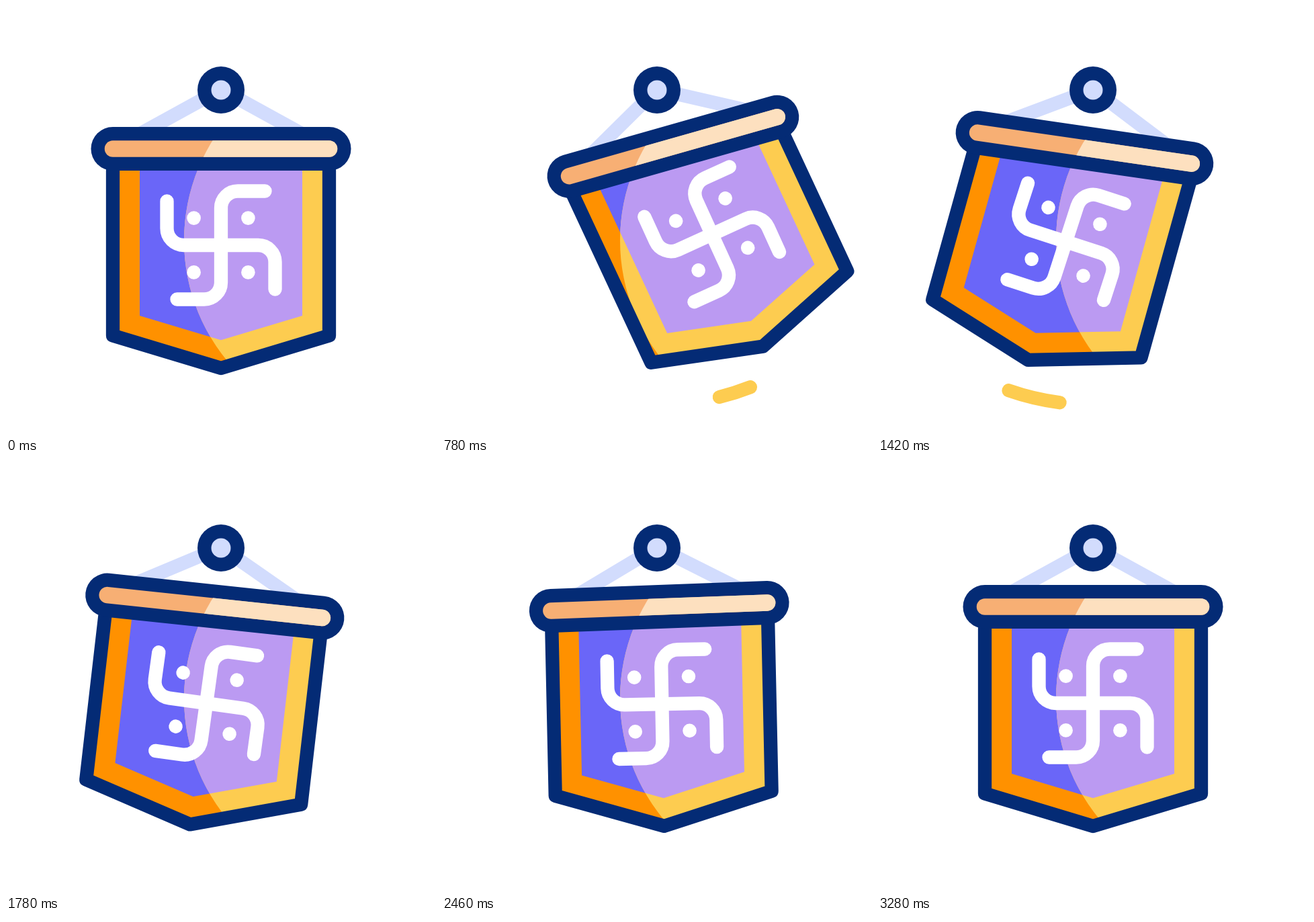
These frames come from a looping animation (640x640 px, 3.6 s). An HTML page with a canvas:

```html
<!DOCTYPE html>
<html lang="en">
<head>
<meta charset="utf-8">
<title>Swinging banner</title>
<style>
  html, body { margin: 0; width: 100%; height: 100%; overflow: hidden; background: #fff; }
  canvas { display: block; width: 640px; height: 640px; }
</style>
</head>
<body>
<canvas id="stage" width="640" height="640"></canvas>
<script>
const ctx = document.getElementById('stage').getContext('2d');
const LOOP = 3600, RAD = Math.PI / 180;
const NAVY = '#042b75', PALE = '#d2dcfd', YELLOW = '#fdcc50';
const DARK = { bar: '#f7af74', cloth: '#ff9100', panel: '#6a66f8' };
const LIGHT = { bar: '#fde0bf', cloth: YELLOW, panel: '#bb9af2' };

// Keyframes are [time, value]; slowStart > 1 delays the first segment.
const swingKeys = [[0, 0], [870, -16.5], [1540, 10.5], [2210, -4.6], [2830, 2.3], [3280, 0]];
const clothKeys = [[0, 0], [740, -9.4], [1300, 8], [2100, -3.5], [2500, 1], [3000, -0.3], [3280, 0]];
const signTurn = [[0, 0], [480, 0.6], [1080, 0.35], [1420, 2.4], [2120, 0.3], [2760, 0]];
const signX = [[0, 0], [480, -1.6], [1250, 7.4], [2200, 1], [2760, 0]];
const signY = [[0, 0], [480, 0.5], [1300, -2], [2120, 3], [2760, 0]];

function track(keys, t, slowStart = 1) {
  if (t <= keys[0][0]) return keys[0][1];
  const i = keys.findIndex(k => k[0] > t);
  if (i < 0) return keys[keys.length - 1][1];
  const [t0, v0] = keys[i - 1], [t1, v1] = keys[i];
  const u = ((t - t0) / (t1 - t0)) ** (i === 1 ? slowStart : 1);
  return v0 + (v1 - v0) * u * u * (3 - 2 * u);
}

function stroke(color, width, cap = 'round') {
  ctx.strokeStyle = color;
  ctx.lineWidth = width;
  ctx.lineCap = cap;
  ctx.lineJoin = 'round';
  ctx.stroke();
}

function polyline(...points) {
  ctx.beginPath();
  points.forEach(p => ctx.lineTo(...p));
}

function disc(x, y, r, color) {
  ctx.beginPath();
  ctx.arc(x, y, r, 0, 7);
  ctx.fillStyle = color;
  ctx.fill();
}

function rotateAbout(x, y, degrees) {
  ctx.translate(x, y);
  ctx.rotate(degrees * RAD);
  ctx.translate(-x, -y);
}

// Draws once in shade, then again lit inside the fixed highlight circle.
function twoTone(pose, draw) {
  for (const tones of [DARK, LIGHT]) {
    ctx.save();
    if (tones === LIGHT) {
      ctx.beginPath();
      ctx.arc(547, 349, 282, 0, 7);
      ctx.clip();
    }
    pose();
    draw(tones);
    ctx.restore();
  }
}

function posed(pose, draw) {
  ctx.save();
  pose();
  draw();
  ctx.restore();
}

function pennant(left, bottom, tip) {
  polyline([left, 210], [left, bottom], [320, tip], [640 - left, bottom], [640 - left, 210]);
}

function drawSign(t) {
  ctx.translate(320 + track(signX, t), 356 + track(signY, t));
  ctx.rotate(track(signTurn, t) * RAD);
  for (let i = 0; i < 4; i++) {
    if (i < 2) {
      ctx.beginPath();
      ctx.moveTo(65.5, -80.5);
      ctx.arcTo(0, -80.5, 0, 0, 25);
      ctx.arcTo(0, 80.5, -65.5, 80.5, 25);
      ctx.lineTo(-65.5, 80.5);
      stroke('#fff', 20.3);
    }
    disc(40.4, 40.4, 10.3, '#fff');
    ctx.rotate(90 * RAD);
  }
}

// side 1 sweeps left to right, side -1 sweeps back.
function swoosh(side, tail, head) {
  if (head - tail < 0.002) return;
  const angle = p => (90 + side * 23.2 * (1 - 2 * p)) * RAD;
  ctx.beginPath();
  ctx.arc(320, 212.5, 381, angle(tail), angle(head), side > 0);
  stroke(YELLOW, 20.3);
}

function render(t) {
  const swing = track(swingKeys, t, 1.17);
  const lag = track(clothKeys, t, 1.17);
  const barPose = () => rotateAbout(320, 125, swing);
  const clothPose = () => { barPose(); rotateAbout(320, 240, lag); };

  ctx.fillStyle = '#fff';
  ctx.fillRect(0, 0, 640, 640);

  swoosh(1, track([[380, 0], [940, 1]], t), track([[0, 0], [870, 1]], t, 1.17));
  swoosh(-1, track([[1080, 0], [1640, 1]], t), track([[870, 0], [1542, 1]], t));

  posed(barPose, () => {
    polyline([190, 195.5], [320, 124], [450, 195.5]);
    stroke(PALE, 20.3, 'butt');
  });

  twoTone(clothPose, tones => {
    pennant(159, 490.5, 539);
    ctx.fillStyle = tones.cloth;
    ctx.fill();
    pennant(199, 461, 497.3);
    ctx.fillStyle = tones.panel;
    ctx.fill();
  });
  posed(clothPose, () => {
    pennant(159, 490.5, 539);
    stroke(NAVY, 20.3, 'butt');
    drawSign(t);
  });

  const bar = () => polyline([159, 212.5], [481, 212.5]);
  posed(barPose, () => { bar(); stroke(NAVY, 65); });
  twoTone(barPose, tones => { bar(); stroke(tones.bar, 24.5); });

  disc(320, 125, 35, NAVY);
  disc(320, 125, 14.5, PALE);
}

function tick() {
  render(performance.now() % LOOP);
  requestAnimationFrame(tick);
}
tick();
</script>
</body>
</html>
```
